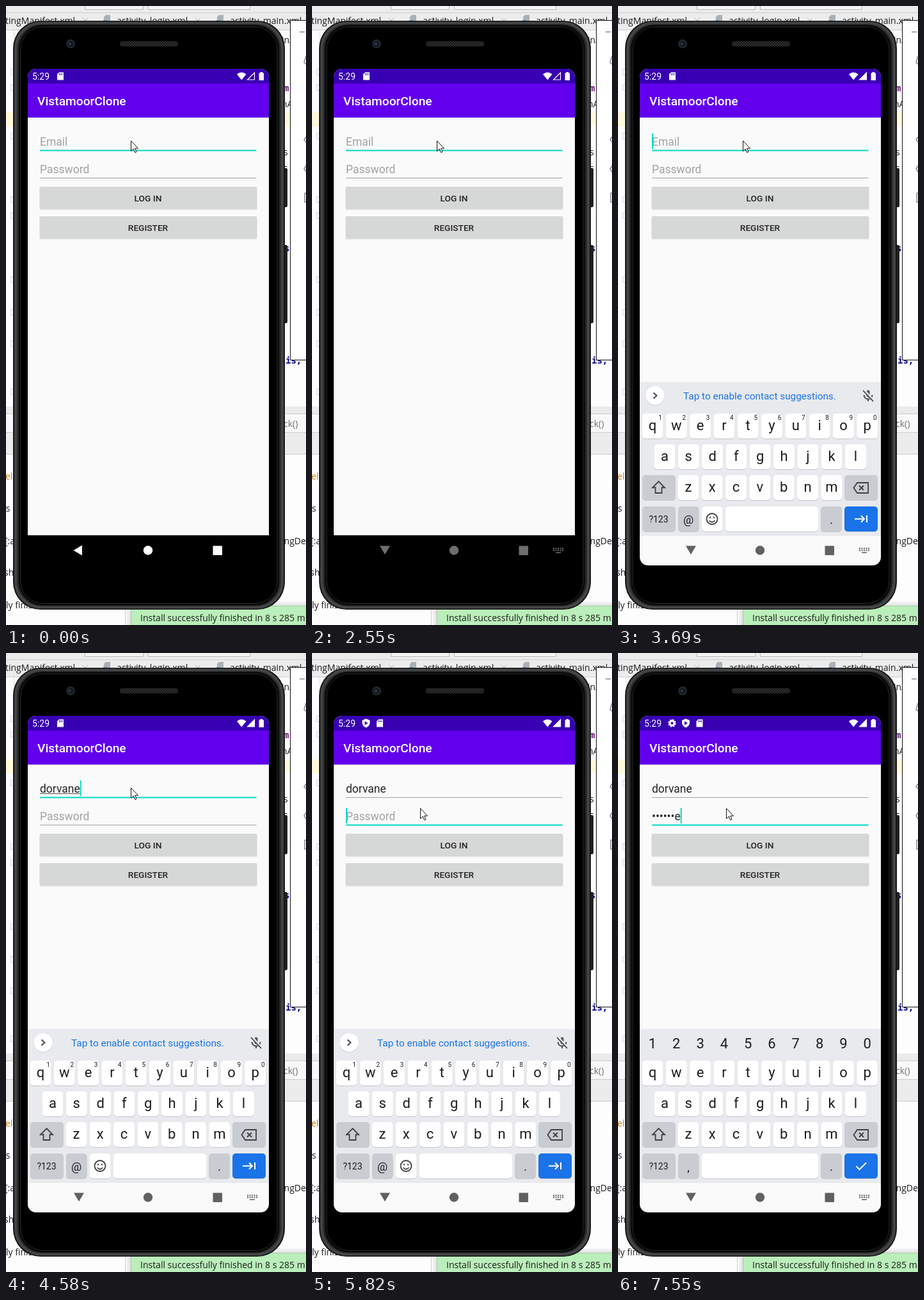
Recreate the animation shown at these times as an HTML page. Size 469 px wide and 966 px high, loop 8 s.

```html
<!DOCTYPE html>
<html lang="en">
<head>
<meta charset="utf-8">
<title>Login screen</title>
<style>
html, body { margin: 0; width: 100%; height: 100%; overflow: hidden; background: #fdfdfd; }
svg { display: block; width: 469px; height: 966px; font-family: Roboto, sans-serif; }
text { white-space: pre; }
.ide { font: 14px "Open Sans", sans-serif; fill: #1d1d1d; }
.code { font: bold 14px "DejaVu Sans Mono", monospace; fill: #000080; }
.hint { font-size: 17.5px; fill: #a2a2a2; }
.typed { font-size: 17.5px; fill: #242424; }
.button { font-size: 13.7px; font-weight: 500; fill: #222; text-anchor: middle; }
.key { font-size: 22px; fill: #1b1c1e; text-anchor: middle; }
.line { fill: none; stroke: #3c4043; stroke-width: 1.8; }
</style>
</head>
<body>
<svg viewBox="0 0 469 966">
  <defs>
    <clipPath id="screenClip"><rect x="34" y="98" width="377" height="775" rx="13"/></clipPath>
    <pattern id="mesh" width="4" height="4" patternUnits="userSpaceOnUse">
      <rect width="4" height="4" fill="#303030"/><path d="M0 0H2V2H0ZM2 2H4V4H2Z" fill="#161616"/>
    </pattern>
    <g id="sd"><path d="M-2-6H5V6H-5V-3Z"/><path d="M-1.5-4.5v3M.7-4.5v3M2.9-4.5v3" stroke="#3700b3"/></g>
    <g id="shield"><path d="M0-7L6-4.5V0Q5 5 0 7Q-5 5-6 0V-4.5Z"/><path d="M-2-3L3 0L-2 3Z" fill="#3700b3"/></g>
    <g id="gear" fill="none" stroke="#fff"><circle r="3.5" stroke-width="3"/><circle r="5.2" stroke-width="2" stroke-dasharray="2.4 1.684"/></g>
    <g id="file" fill="#a9b0b7"><path d="M-2-7H5V6H-5V-4Z"/><rect x="-6" y="1" width="6" height="6" fill="#7c8794"/></g>
  </defs>

  <!-- editor behind the phone -->
  <rect width="469" height="37" fill="#ececec"/>
  <path d="M0 10.5H469M0 37.5H469" stroke="#cfcfcf"/>
  <path d="M123.5 0V5.5H214.5V0M222.5 0V5.5H381.5V0" fill="#f4f4f4" stroke="#b9b9b9"/>
  <g class="ide">
    <text x="-1" y="28">tingManifest.xml</text>
    <text x="173" y="28">activity_login.xml</text>
    <text x="350" y="28">activity_main.xml</text>
  </g>
  <path d="M120 19l8 8m0-8l-8 8M296 19l8 8m0-8l-8 8" stroke="#aaa"/>
  <use href="#file" x="158" y="21"/><use href="#file" x="335" y="21"/>
  <path d="M0 166H12V188H0ZM436 166H445V188H436Z" fill="#fff8da"/>
  <path d="M12.5 38V636" stroke="#ddd"/>
  <g id="folds" fill="none" stroke="#d2d2d2"></g>
  <rect y="625" width="469" height="11" fill="#ebebeb"/>
  <rect y="636" width="469" height="30" fill="#f8f8f8"/>
  <rect y="666" width="469" height="33" fill="#ececec"/>
  <path d="M0 636.5H469M0 665.5H469M0 699.5H469" stroke="#cbcbcb"/>
  <g class="ide">
    <text x="-1" y="739" style="fill:#c98218">el</text>
    <text x="-7" y="789">ss</text>
    <text x="-2" y="840">[:app</text>
    <text x="-3" y="889">sh</text>
    <text x="0" y="940">ly finished</text>
    <text x="431" y="58">inA</text>
    <text x="431" y="158">nA</text>
    <text x="434" y="233">s</text><text x="434" y="258">s</text>
    <text x="434" y="657" style="fill:#77706a">ck()</text>
    <text x="431" y="840">ingDes</text>
  </g>
  <g class="code">
    <text x="434" y="133" style="fill:#660e7a">m</text>
    <text x="435" y="383">s</text><text x="437" y="558">is,</text>
  </g>
  <path d="M470 22.5H444.5V552.5H470" fill="#fff" stroke="#111"/>
  <path d="M459 40.5H467M469 78l-3 10 3 3M469 204l-3 5 3 3M469 249l-3 5 3 5M469 292h-2v14h2" fill="none" stroke="#8b8b8b" stroke-width="1.5"/>
  <path d="M186.5 936V966" stroke="#ccc"/>
  <g fill="none" stroke="#000" stroke-opacity=".05">
    <rect x="195.5" y="936.5" width="280" height="36" stroke-width="14"/>
    <rect x="195.5" y="936.5" width="280" height="36" stroke-width="7"/>
  </g>
  <rect x="195.5" y="936.5" width="280" height="36" fill="#baeeba" stroke="#a4cfa4"/>
  <text class="ide" x="210" y="960">Install successfully finished in 8 s 285 m</text>

  <!-- phone -->
  <path d="M434 253h4q2 0 2 3v55q0 3-2 3h-4ZM434 373h4q2 0 2 3v116q0 3-2 3h-4Z" fill="#202020"/>
  <rect x="11" y="23" width="425" height="919" rx="43" fill="#151515"/>
  <rect x="15" y="26.5" width="417" height="912" rx="40" fill="#2b2c2d" stroke="#434445" stroke-width="4"/>
  <rect x="20.5" y="30" width="406" height="905" rx="37" fill="#000" stroke="#111" stroke-width="2"/>
  <rect x="23" y="32.5" width="401" height="900" rx="35" fill="none" stroke="#2c2d2e"/>
  <circle cx="101" cy="59" r="7" fill="#242529"/><circle cx="101" cy="59" r="4" fill="#11151f"/><circle cx="100" cy="59" r="1.8" fill="#304875"/>
  <rect x="178" y="55" width="91" height="8" rx="4" fill="url(#mesh)"/>

  <g clip-path="url(#screenClip)">
    <rect x="34" y="98" width="377" height="728" fill="#fafafa"/>
    <rect x="34" y="174" width="377" height="1" fill="#d9d9d9"/>
    <rect x="34" y="98" width="377" height="23" fill="#3700b3"/>
    <rect x="34" y="121" width="377" height="53" fill="#6200ee"/>
    <g fill="#fff">
      <text x="41" y="115" font-size="14">5:29</text>
      <text x="49" y="155" font-size="19.2" font-weight="500">VistamoorClone</text>
      <use id="gearIcon" href="#gear" x="84.5" y="109.5"/>
      <use id="shieldIcon" href="#shield" y="109.5"/>
      <use id="sdIcon" href="#sd" y="109.5"/>
      <path d="M361 106.5Q368 100.5 375.5 106.5L368.2 115.5Z"/>
      <path id="signal" d="M377.5 115L388.5 104V115Z" stroke="#fff" stroke-width="1.2"/>
      <path d="M395.5 104.5H397.5V103H401V104.5H403V116H395.5Z"/>
    </g>
    <text class="hint" id="emailHint" x="53" y="218">Email</text>
    <text class="hint" id="passHint" x="53" y="261">Password</text>
    <text class="typed" id="email" x="53" y="218"></text>
    <text class="typed" id="pass" x="53" y="261"></text>
    <rect id="wordLine" x="53" y="219" height="1" fill="#555"/>
    <rect id="emailLine" x="53" width="338.5"/>
    <rect id="passLine" x="53" width="338.5"/>
    <rect id="caret" width="2" height="24" fill="#03dac5"/>
    <g id="buttons"></g>

    <g id="keyboard">
      <rect x="34" y="587" width="377" height="240" fill="#e8eaed"/>
      <rect x="34" y="827" width="377" height="46" fill="#fafafa"/>
      <g id="keys"></g>
      <g id="emailKeys">
        <circle cx="58" cy="609" r="14.5" fill="#c9cbce"/><circle cx="58" cy="608" r="14.5" fill="#fff"/>
        <path class="line" d="M55.5 603.5L60.5 608L55.5 612.5"/>
        <text x="102" y="614" font-size="15.35" fill="#1a73e8">Tap to enable contact suggestions.</text>
        <path d="M388.5 602a2.5 2.5 0 0 1 5 0v6a2.5 2.5 0 0 1-5 0Z" fill="#55595e"/>
        <path class="line" d="M384.5 607q.5 6.5 6.5 6.5t6.5-6.5M391 613.5V617"/>
        <path d="M384 599l15 17" stroke="#e8eaed" stroke-width="4"/><path class="line" d="M383 600l16 17"/>
      </g>
      <g id="passKeys"></g>
      <path class="line" d="M63.5 742L73 751.5H68.5V760H58.5V751.5H54Z"/>
      <path class="line" d="M374 744H391V760H374L368.5 752ZM377 748.5l7 7m0-7l-7 7"/>
    </g>

    <g id="nav">
      <path id="back" d="M105.5 849.5L119 841.5V857.5Z"/>
      <circle cx="222" cy="849.5" r="7.2"/>
      <rect x="323.5" y="842.5" width="14.5" height="14.5" rx="1"/>
      <path id="imeIcon" d="M377 846.5H393M377 849.5H393" fill="none" stroke-width="2" stroke-dasharray="2 1.5"/>
      <path id="imeBar" d="M381 853H389" fill="none" stroke-width="1.5"/>
    </g>
  </g>
  <path id="pointer" d="M.5.5V16.5L4.3 13L6.7 18.7L9 17.7L6.6 12.2H11.5Z" fill="#fff" stroke="#111"/>
</svg>
<script>
const $ = id => document.getElementById(id);
const LOOP = 8000, LEFT = 53, PITCH = 37.3, NAME = "dorvane";
const TEAL = "#03dac5", GRAY = "#a3a3a3", MOD = "#c9ccd1";

// ---- static parts built by rule
$("folds").innerHTML = [103, 127, 203, 302, 327, 427, 478, 527, 602]
  .map(y => `<path d="M13 ${y - 4.5}H7.5V${y + 4.5}H13"/>`).join("");

$("buttons").innerHTML = [["LOG IN", 282], ["REGISTER", 328]].map(([label, y]) =>
  `<rect x="52" y="${y}" width="341" height="36.5" rx="3" fill="#e7e7e7"/>
   <rect x="53" y="${y}" width="339" height="35" rx="2" fill="#d6d7d7"/>
   <text class="button" x="222" y="${y + 23}">${label}</text>`).join("");

const cap = (x, y, w, fill = "#fff") =>
  `<rect x="${x}" y="${y + 1}" width="${w}" height="39" rx="5" fill="#c3c6ca"/>
   <rect x="${x}" y="${y}" width="${w}" height="39" rx="5" fill="${fill}"/>`;
const label = (x, y, s, size = 22) => `<text class="key" x="${x}" y="${y}" style="font-size:${size}px">${s}</text>`;
const row = (letters, x, y) => [...letters].map((c, i) =>
  cap(x + i * PITCH - 16.5, y, 33) + label(x + i * PITCH, y + 26, c)).join("");
const digits = (x, y, size) => [..."1234567890"].map((d, i) => label(x + i * PITCH, y, d, size)).join("");

$("keys").innerHTML = row("qwertyuiop", 54, 636) + row("asdfghjkl", 73, 684) + row("zxcvbnm", 110, 732) +
  cap(38, 732, 52, MOD) + cap(354, 732, 52, MOD) +
  cap(38, 781, 52, MOD) + label(63.5, 806, "?123", 14) +
  cap(94, 781, 32.5, MOD) + cap(317, 781, 33, MOD) + label(333.5, 808, ".", 19) +
  cap(354, 781, 52, "#1a73e8");
$("emailKeys").innerHTML += digits(66, 646, 10) + label(110, 808, "@", 18) +
  cap(131, 781, 32.5) + cap(168, 781, 145) +
  `<circle class="line" cx="147" cy="800.5" r="8.5"/><path class="line" d="M142.5 803q4.5 5 9 0M144 797v2.5M150 797v2.5"/>
   <path d="M370 800.5H385M380 795.5l5 5-5 5M389 795V806" fill="none" stroke="#fff" stroke-width="2"/>`;
$("passKeys").innerHTML = digits(54, 617, 22) + label(110, 809, ",", 19) + cap(131, 781, 182) +
  '<path d="M372.5 801l5 5 10.5-10.5" fill="none" stroke="#fff" stroke-width="2"/>';

// ---- motion
// Value of the last [start, value] pair that has begun.
const pick = (t, ...steps) => steps.reduce((v, [start, value]) => t >= start ? value : v, steps[0][1]);
const show = (id, on) => $(id).setAttribute("opacity", +on);
const set = (id, attrs) => { for (const k in attrs) $(id).setAttribute(k, attrs[k]); };
const underline = (id, y, focused, color) =>
  set(id, { y: focused ? y : y + .5, height: focused ? 2 : 1, fill: color });

function draw(t) {
  // status bar
  show("gearIcon", t >= 6530);
  show("shieldIcon", t >= 5670);
  show("sdIcon", pick(t, [0, 1], [6530, 0], [6840, .5], [6990, 1]));
  set("shieldIcon", { x: t < 6530 ? 84.5 : 106 });
  set("sdIcon", { x: pick(t, [0, 85], [5670, 106], [6530, 127.5]) });
  set("signal", { fill: t < 2980 ? "none" : "#fff" });

  // fields
  const n = pick(t, [0, 0], [3820, 1], [4120, 4], [4430, 6], [4580, 7]);
  const m = pick(t, [0, 0], [6990, 4], [7270, 5], [7420, 6], [7550, 7]);
  $("email").textContent = NAME.slice(0, n);
  $("pass").textContent = m ? "•".repeat(m - 1) + NAME[m - 1] : "";
  show("emailHint", !n);
  show("passHint", !m);
  const inPass = t >= 5670;
  const nameWidth = n ? $("email").getComputedTextLength() : 0;
  const passWidth = m ? $("pass").getComputedTextLength() : 0;
  set("wordLine", { width: t < 5820 ? nameWidth : 0 });
  underline("emailLine", 224.5, t < 5820, pick(t, [0, TEAL], [5670, "#6fbdb4"], [5820, GRAY]));
  underline("passLine", 267.5, inPass, inPass ? TEAL : GRAY);
  set("caret", { x: LEFT + (inPass ? passWidth : nameWidth), y: inPass ? 242 : 199 });
  show("caret", pick(t, [0, 0], [590, 1], [1020, 0], [1570, 1], [2130, 0], [2700, 1],
    [3130, 0], [3690, 1], [5390, 0], [5820, 1], [6400, 0], [6840, 1]));

  // keyboard and navigation
  show("keyboard", t >= 2700);
  show("emailKeys", t < 6840);
  show("passKeys", t >= 6840);
  const tint = pick(t, [0, "#fff"], [2430, "#adadad"], [2550, "#6e6e6e"], [2700, "#616161"]);
  set("nav", { fill: tint });
  for (const id of ["imeIcon", "imeBar"]) { set(id, { stroke: tint }); show(id, t >= 310); }
  const turn = pick(t, [0, 0], [1020, -60], [1150, -90]);
  set("back", { transform: `rotate(${turn} 113 848.5)` });

  const [x, y] = pick(t, [0, [195, 210]], [5240, [194, 213]], [5390, [176, 236]], [5520, [169, 242]]);
  set("pointer", { transform: `translate(${x} ${y})` });
}

const begin = performance.now();
(function tick() {
  draw((performance.now() - begin) % LOOP);
  requestAnimationFrame(tick);
})();
</script>
</body>
</html>
```
